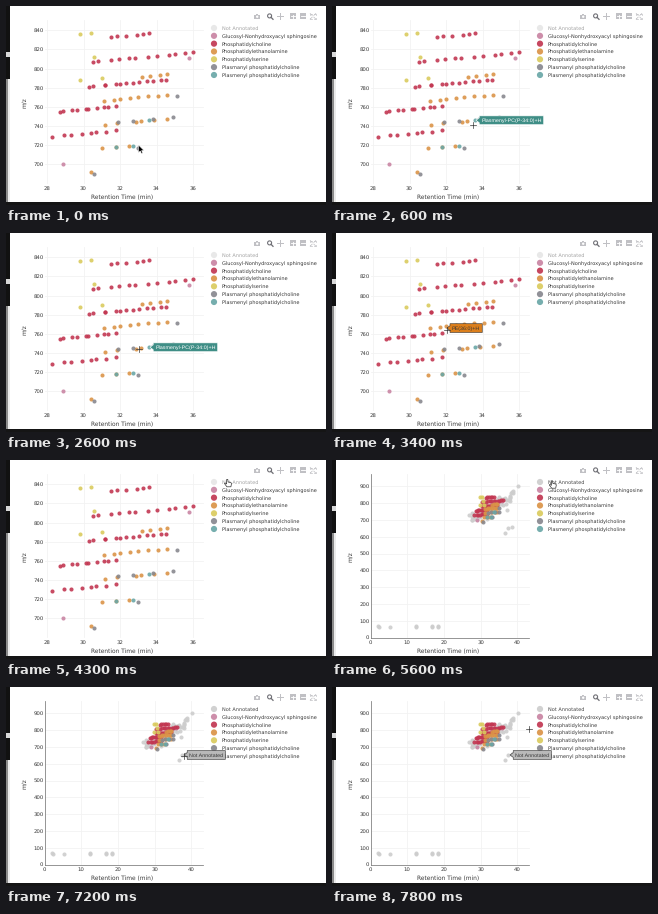
These frames come from a looping animation (320x199 px, 8000 ms). A matplotlib script:

```python
from itertools import product

import matplotlib.pyplot as plt
import numpy as np
from matplotlib.animation import FuncAnimation
from matplotlib.patches import Circle, Polygon, Rectangle

W, H, DPI = 320, 199, 100
STEP, FRAMES = 100, 80
PT = 72 / DPI
plt.rcParams.update({"font.family": "DejaVu Sans", "text.hinting": "none",
                     "toolbar": "None"})

INK, ICON, GRID = "#383838", "#c0c0c4", "#f2f2f2"
GRAY, PINK, RED, ORANGE = "#cdcdcd", "#c985a3", "#c23752", "#db9448"
YELLOW, SLATE, TEAL = "#dacb5e", "#88888f", "#6aa7a7"
LEGEND = [("Not Annotated", GRAY), ("Glucosyl-Nonhydroxyacyl sphingosine", PINK),
          ("Phosphatidylcholine", RED), ("Phosphatidylethanolamine", ORANGE),
          ("Phosphatidylserine", YELLOW), ("Plasmanyl phosphatidylcholine", SLATE),
          ("Plasmenyl phosphatidylcholine", TEAL)]

# Lipid families: top m/z, drop per row, then (first RT, last RT, count) per row
FAMILIES = {
    PINK: (811, 111, [(35.8, 35.8, 1), (28.9, 28.9, 1)]),
    RED: (833, 26, [(31.5, 33.6, 6), (30.5, 36, 12), (30.3, 34.5, 13),
                    (28.7, 31.8, 10), (28.3, 31.8, 8)]),
    ORANGE: (791.5, 25, [(33.2, 34.6, 4), (31.1, 34.6, 8), (31.2, 34.6, 6),
                         (31, 32.5, 3), (30.4, 30.4, 1)]),
    YELLOW: (836, 24, [(29.8, 30.4, 2), (30.6, 30.6, 1), (29.8, 31, 2)]),
    SLATE: (771, 27, [(35.1, 35.1, 1), (31.9, 34.9, 4), (33, 33, 1), (30.6, 30.6, 1)]),
    TEAL: (746, 28, [(33.6, 33.6, 1), (31.8, 32.7, 2)]),
}


def family_points(top, drop, rows, rng):
    """Rows of equal chain length: m/z climbs slowly with retention time."""
    points = []
    for k, (first, last, n) in enumerate(rows):
        u = np.linspace(0, 1, n)
        u[1:-1] += rng.normal(0, 0.25 / n, max(n - 2, 0))
        rise = 1.8 * (last - first) * u
        points.append(np.column_stack([first + (last - first) * u, top - drop * k + rise]))
    return np.vstack(points)


def unknown_points(rng):
    """Unannotated features: a rising band, an early group and some outliers."""
    rt = rng.uniform(26.8, 39.3, 75)
    band = np.column_stack([rt, 705 + 11 * (rt - 26.8) + rng.normal(0, 20, 75)])
    early = list(product((12.4, 16.7, 18.3), (60, 71)))
    outliers = [(2, 71), (2.2, 63), (5.2, 60), (40.2, 902),
                (36.6, 625), (37.5, 650), (38.5, 655)]
    return np.vstack([band, early, outliers])


def zoom_xy(rt, mz):
    return 41 + (rt - 28) * 18.25, 24.3 + (840 - mz) * 0.957


def full_xy(rt, mz):
    return 38.5 + rt * 3.67, 177.5 - mz * 0.168


fig = plt.figure(figsize=(W / DPI, H / DPI), dpi=DPI, facecolor="white")
ax = fig.add_axes([0, 0, 1, 1])
ax.set(xlim=(0, W), ylim=(H, 0))
ax.axis("off")


def text(x, y, s, px, ha="center", **kw):
    kw = {"color": INK, "va": "center_baseline", **kw}
    return ax.text(x, y, s, fontsize=px * PT, ha=ha, **kw)


def line(xs, ys, color, width=1, **kw):
    return ax.plot(xs, ys, color=color, lw=width * PT, **kw)[0]


def box(x, y, w, h, color):
    return ax.add_patch(Rectangle((x, y), w, h, fc=color, lw=0))


def view(place, rts, mzs, traces):
    parts = []
    for rt in rts:
        x = place(rt, 0)[0]
        parts += [line([x, x], [14, 177], GRID, 0.8, zorder=1),
                  text(x, 182, str(rt), 5.4)]
    for mz in mzs:
        y = place(0, mz)[1]
        parts += [line([38.5, 196.5], [y, y], GRID, 0.8, zorder=1),
                  text(37.5, y, str(mz), 5.4, "right")]
    for color, points in traces.items():
        x, y = place(*points.T)
        parts.append(ax.scatter(x, y, s=(4.1 * PT) ** 2, c=color, lw=0,
                                alpha=0.9, zorder=3))
    return parts


def draw_window():
    box(0, 0, 4, 73, "#111111")
    box(0, 46, 4, 5, "#d8d8d8")
    box(0, 73, 1.5, 123, "#8c8c8c")
    box(1.5, 73, 2.5, 123, "#ececec")
    box(0, 196, W, 3, "#151515")


def draw_toolbar():
    y, active = 10.3, "#707076"
    box(248, y - 1.8, 6.4, 4.3, ICON)
    box(250, y - 2.6, 2.4, 1, ICON)
    ax.add_patch(Circle((251.2, y + 0.4), 1.2, fc="white", lw=0))
    ax.add_patch(Circle((263.6, y - 0.4), 2, fc="none", ec=active, lw=1.1 * PT))
    line([265, 267], [y + 1, y + 3], active, 1.3)
    line([271.3, 277.3], [y, y], ICON)
    line([274.3, 274.3], [y - 3, y + 3], ICON)
    for x in (287, 297):
        box(x - 3, y - 3, 6, 6, ICON)
        line([x - 1.8, x + 1.8], [y, y], "white", 0.9)
    line([287, 287], [y - 1.8, y + 1.8], "white", 0.9)
    for sx, sy in product((-1, 1), repeat=2):
        cx, cy = 307 + 2.8 * sx, y + 2.8 * sy
        line([307 + 0.8 * sx, cx], [y + 0.8 * sy, cy], ICON, 0.7)
        line([cx - 1.6 * sx, cx, cx], [cy, cy, cy - 1.6 * sy], ICON, 0.7)


draw_window()
draw_toolbar()
text(116.5, 191, "Retention Time (min)", 5.9)
text(18.5, 97, "m/z", 5.9, rotation=90, va="center")

unknown_item = []
for i, (name, color) in enumerate(LEGEND):
    y = 22 + 7.83 * i
    mark = ax.add_patch(Circle((208, y), 3.1, fc=color, lw=0, alpha=0.92))
    label = text(216, y, name, 5, "left")
    if name == "Not Annotated":
        unknown_item = [mark, label]

rng = np.random.default_rng(4)
known = {color: family_points(*spec, rng) for color, spec in FAMILIES.items()}
zoomed = view(zoom_xy, range(28, 37, 2), range(700, 841, 20), known)
full = view(full_xy, range(0, 41, 10), range(0, 901, 100),
            {GRAY: unknown_points(rng), **known})
full += [line([38.5, 38.5], [14, 177.5], "#707070", 0.7, zorder=2),
         line([38.5, 196.5], [177.5, 177.5], "#707070", 0.7, zorder=2)]

# Hover label
tip = ax.add_patch(Polygon([(0, 0)] * 3, lw=0.6 * PT, zorder=5))
tip_text = text(0, 0, "", 5.4, "left", family="Liberation Sans", zorder=6)

# Pointers, drawn around their hot spot
ARROW = np.array([(0, 0), (0, 7.6), (1.8, 6), (3, 8.6), (4.2, 8), (3.1, 5.6), (5.4, 5.4)])
HAND = np.array([(-0.8, -2.6), (0.3, -2.6), (0.6, 0), (3.4, 0.6), (4, 1.5), (3.4, 4.8),
                 (-0.6, 4.8), (-3, 1.6), (-2.4, 0.9), (-0.9, 2)])
CROSS = np.array([(-3, 0), (3, 0), (np.nan, np.nan), (0, -3), (0, 3)])
arrow = ax.add_patch(Polygon(ARROW, fc="black", ec="white", lw=0.5 * PT, zorder=8))
hand = ax.add_patch(Polygon(HAND, fc="white", ec="#333333", lw=0.7 * PT, zorder=8))
cross = line([0], [0], "#3a3a3a", 0.7, zorder=8)

# Pointer stops: arrive, leave, x, y
STOPS = [(0, 0, 132.5, 139), (800, 1200, 142, 115), (1300, 1700, 127, 142),
         (2000, 2300, 142, 116), (2600, 3100, 133, 115.5), (3400, 3600, 115, 97),
         (3800, 3900, 149, 93), (4300, 5500, 221.5, 22), (6500, 6600, 179, 72.5),
         (7200, 7200, 178, 69), (7800, 8000, 197, 42)]
CLICKED = 5500

# Hover labels: start, end, RT, m/z, name
HOVERS = [(500, 1300, 33.6, 746, "Plasmenyl-PC(P-34:0)+H"),
          (1300, 2000, 32.7, 718, "Plasmenyl-PC(P-32:0)+H"),
          (2000, 2800, 33.6, 746, "Plasmenyl-PC(P-34:0)+H"),
          (2800, 3300, 33.1, 745, "PE(34:0)+H"),
          (3300, 3700, 32, 766, "PE(36:0)+H"),
          (3800, 4100, 34, 769, "PE(36:2)+H"),
          (6400, 6800, 36.6, 625, "Not Annotated"),
          (6800, 8000, 37.8, 652, "Not Annotated")]
TIP_STYLE = {"Pl": ("#3f8e86", "white"), "PE": ("#dc7f1c", INK), "No": ("#b9b9b9", INK)}


def pointer_at(t):
    for (_, leave, *a), (arrive, _, *b) in zip(STOPS, STOPS[1:]):
        if t < arrive:
            u = max(0, (t - leave) / (arrive - leave))
            return np.array(a) + np.subtract(b, a) * u * u * (3 - 2 * u)
    return np.array(STOPS[-1][2:])


def show_tip(t, place):
    hover = next((h for h in HOVERS if h[0] <= t < h[1]), None)
    tip.set_visible(hover is not None)
    tip_text.set_visible(hover is not None)
    if hover is None:
        return
    _, _, rt, mz, name = hover
    fill, ink = TIP_STYLE[name[:2]]
    x, y = place(rt, mz)
    tip_text.set(text=name, color=ink, position=(x + 6, y))
    right = x + 8 + tip_text.get_window_extent().width
    left, top, low = x + 4, y - 4.4, y + 4.4
    tip.set_xy([(x + 0.8, y), (left, y - 2.4), (left, top), (right, top),
                (right, low), (left, low), (left, y + 2.4)])
    tip.set(facecolor=fill, edgecolor=ink)


def update(k):
    t = k * STEP
    is_full = t >= CLICKED
    for part in zoomed:
        part.set_visible(not is_full)
    for part in full:
        part.set_visible(is_full)
    for part in unknown_item:
        part.set_alpha(0.92 if is_full else 0.45)

    pos = pointer_at(t)
    shape = arrow if t < 100 else hand if pos[0] > 200 else cross
    for item in (arrow, hand, cross):
        item.set_visible(item is shape)
    arrow.set_xy(ARROW + pos)
    hand.set_xy(HAND + pos)
    cross.set_data(*(CROSS + pos).T)
    show_tip(t, full_xy if is_full else zoom_xy)
    return []


anim = FuncAnimation(fig, update, frames=FRAMES, interval=STEP, repeat=True,
                     repeat_delay=0, init_func=lambda: update(0), blit=False)
plt.show()
```
